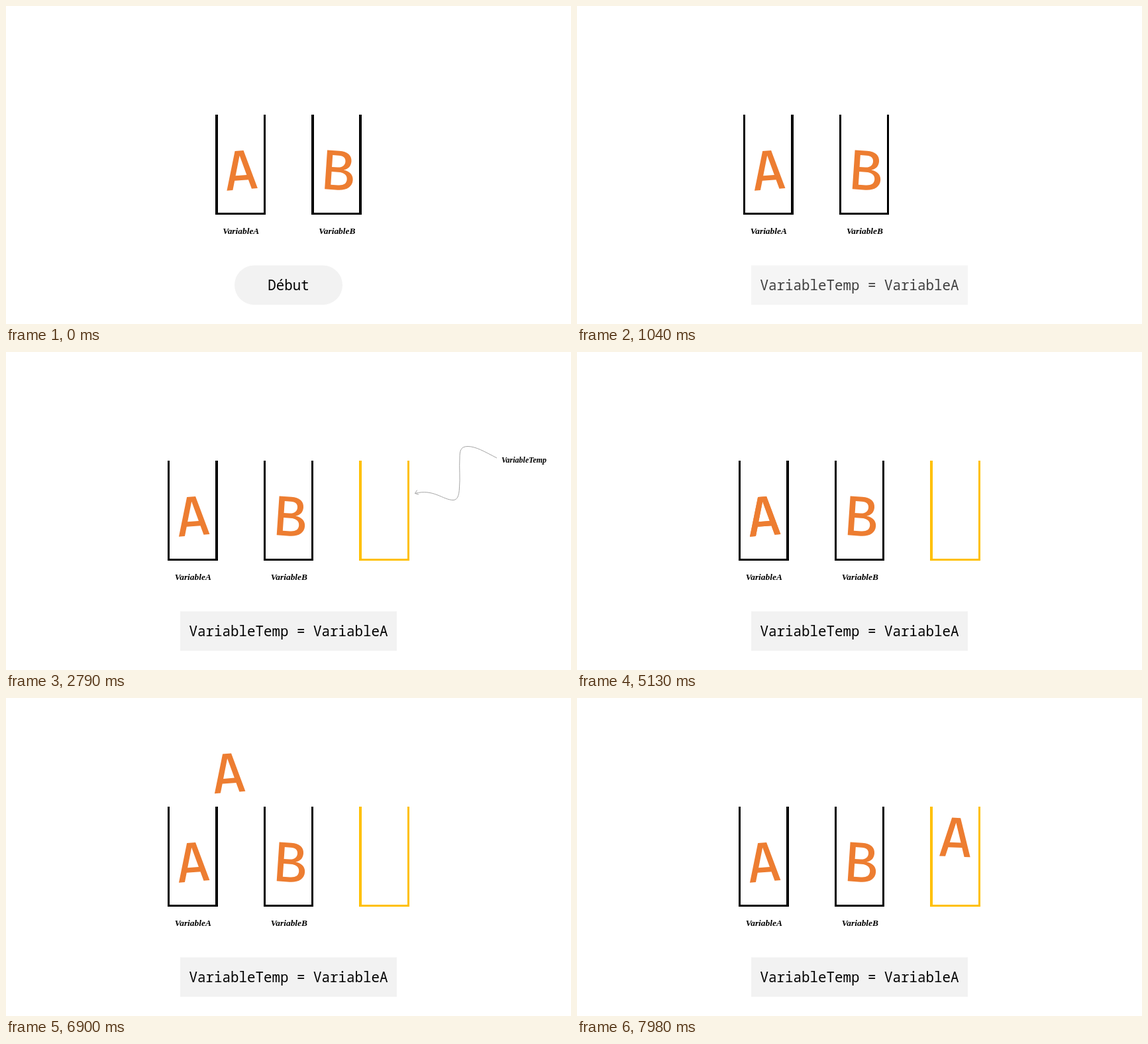
Write an HTML page with a canvas that moves like this. It is 853x480 px and loops after 8 s.

```html
<!DOCTYPE html>
<html lang="fr">
<head>
<meta charset="utf-8">
<title>Variables</title>
<style>
  html, body { margin: 0; width: 100%; height: 100%; overflow: hidden; background: #fff; }
  canvas { display: block; width: 853px; height: 480px; }
</style>
</head>
<body>
<canvas id="stage" width="853" height="480"></canvas>
<script>
const ctx = document.getElementById('stage').getContext('2d');
const LOOP = 8000, STEP = 60;
const ORANGE = '#ed7d31', YELLOW = '#ffc000', PANEL = '#f2f2f2', GREY = '#a6a6a6';
const CODE_FONT = '500 20.85px "Noto Sans Mono", monospace';
const GAP = 144.75, BUCKET_WIDTH = 72.3, HALF_WALL = 1.8;

const letterA = new Path2D(
  'M-6.5-29.3H6.5L23.3 29.3H14.3L10.4 15.5H-10.4L-14.3 29.3H-23.3Z M0-22L8.4 8H-8.4Z');
const letterB = new Path2D(
  'M-19.5-29.5H-1C11-29.5 18-24 18-15C18-7 13-2.5 7-1.2C16 0 22 5 22 13C22 23.5 13 29.5 0 29.5H-19.5Z' +
  'M-10.8-22.5H-1.5C5-22.5 9-20 9-14C9-8 4.5-4.5-2-4.5H-10.8Z' +
  'M-10.8 2.5H-1C8 2.5 13 6 13 12.5C13 19.5 8 22.3 0 22.3H-10.8Z');
const arrow = new Path2D(
  'M741 160C722 150 709 142.5 697 142.5C686 142.5 685 150 685 160C684 175 686 190 684.5 205' +
  'C684 218 681 223.5 675 223.5C660 223.5 645 206 617.5 213.5M620.5 208.5L617.5 213.5L623 215');

const clamp = v => Math.min(1, Math.max(0, v));
const smooth = p => p * p * (3 - 2 * p);

// Progress of a move that is redrawn every STEP ms, counted from `first`.
function progress(t, first, begin, duration) {
  if (t < first) return 0;
  const held = first + Math.floor((t - first) / STEP) * STEP;
  return clamp((held - begin) / duration);
}

function withAlpha(alpha, draw) {
  if (alpha <= 0) return;
  ctx.save();
  ctx.globalAlpha = alpha;
  draw();
  ctx.restore();
}

// Walls snap to whole pixels so that their edges stay crisp.
function bucket(x, color) {
  const edge = v => Math.round(v);
  const left = edge(x - HALF_WALL), innerLeft = edge(x + HALF_WALL);
  const innerRight = edge(x + BUCKET_WIDTH - HALF_WALL);
  const right = edge(x + BUCKET_WIDTH + HALF_WALL);
  ctx.fillStyle = color;
  ctx.fillRect(left, 164, innerLeft - left, 148);
  ctx.fillRect(innerRight, 164, right - innerRight, 148);
  ctx.fillRect(left, 312, right - left, 3);
}

function letter(shape, x, y, degrees) {
  ctx.save();
  ctx.translate(x, y);
  ctx.rotate(degrees * Math.PI / 180);
  ctx.fillStyle = ORANGE;
  ctx.fill(shape, 'evenodd');
  ctx.restore();
}

function text(content, x, y, font) {
  ctx.font = font;
  ctx.fillStyle = '#000';
  ctx.fillText(content, x, y);
}

function label(content, x, y, size = 13.4) {
  text(content, x, y, `italic bold ${size}px "Liberation Serif", serif`);
}

function panel(content, x, width, radius) {
  ctx.fillStyle = PANEL;
  ctx.beginPath();
  ctx.roundRect(x, 391.5, width, 59.5, radius);
  ctx.fill();
  text(content, 426.5, 428.6, CODE_FONT);
}

function movingA(t) {
  const rise = smooth(progress(t, 5570, 5530, 770));
  const carry = smooth(progress(t, 6660, 6615, 1000));
  const drop = smooth(progress(t, 6660, 7580, 635));
  const arc = 84 * carry * (1 - carry);
  letter(letterA,
    281.9 - 4 * rise + 293.6 * carry,
    247.6 - 121 * rise - arc + 121 * drop,
    -4.5 + 9.8 * drop);
}

function draw(t) {
  ctx.fillStyle = '#fff';
  ctx.fillRect(0, 0, 853, 480);
  ctx.textAlign = 'center';

  const morph = progress(t, 500, 440, 960);
  const slide = smooth(1 - Math.pow(1 - morph, 1.68));
  const x = 318.05 - 72.45 * slide;

  withAlpha(1 - clamp(morph * 2), () => panel('Début', 345, 163, 29.75));
  withAlpha(1 - Math.pow(1 - morph, 1.4),
    () => panel('VariableTemp = VariableA', 263, 327, 0));

  bucket(x, '#000');
  bucket(x + GAP, '#000');
  letter(letterA, x + 36.3, 247.6, -4.5);
  letter(letterB, x + 184.5, 248.2, 3.8);
  label('VariableA', x + 36.7, 344);
  label('VariableB', x + 181.8, 344);

  withAlpha(progress(t, 1600, 1540, 240), () => bucket(x + 2 * GAP, YELLOW));

  if (t < 5130) {
    withAlpha(progress(t, 2310, 2250, 540), () => {
      ctx.strokeStyle = GREY;
      ctx.lineWidth = 1;
      ctx.stroke(arrow);
      label('VariableTemp', 782, 167, 12);
    });
  } else {
    movingA(t);
  }
}

const origin = performance.now();
function tick() {
  draw((performance.now() - origin) % LOOP);
  requestAnimationFrame(tick);
}
tick();
</script>
</body>
</html>
```
